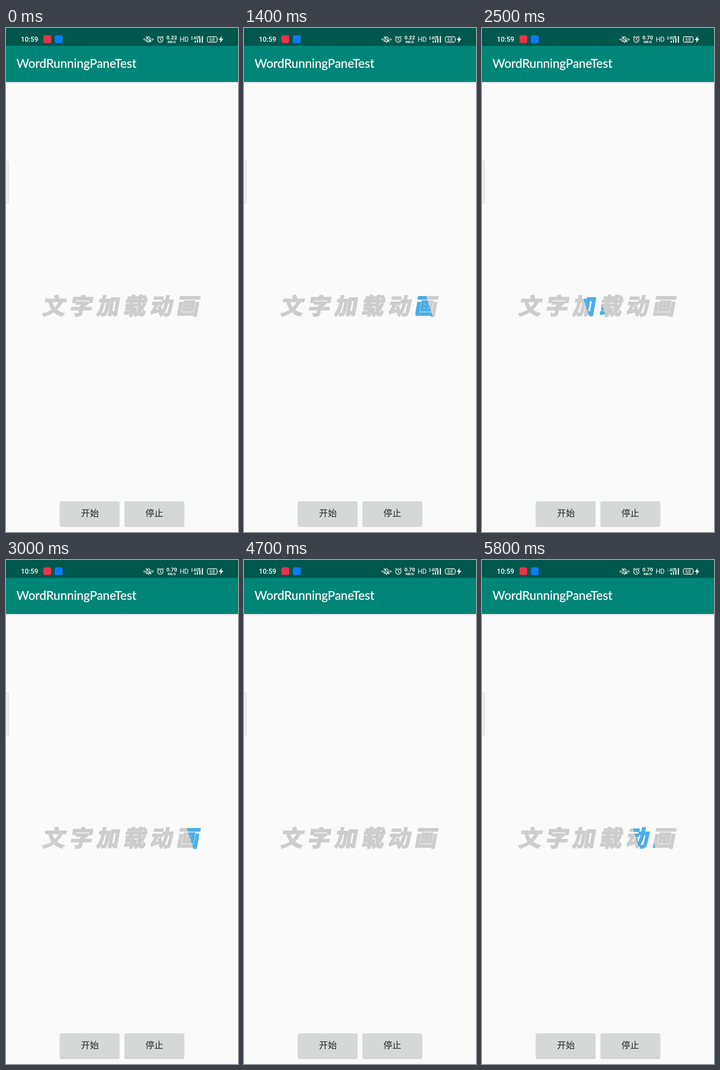
These frames come from a looping animation (508x1102 px, 5900 ms). An HTML page:

```html
<!DOCTYPE html>
<html lang="zh-CN">
<head>
<meta charset="utf-8">
<title>Text sweep</title>
<style>
  html, body { margin: 0; width: 100%; height: 100%; overflow: hidden; background: #fafafa; }
  svg { display: block; width: 100vw; height: 100vh; }
  .ui { font-family: Roboto, "Noto Sans", sans-serif; fill: #fff; }
  .title { font: 400 26.6px Lato, "Open Sans", sans-serif; fill: #fff; stroke: #fff; stroke-width: .3; }
  .mid { text-anchor: middle; }
  .line { fill: none; stroke: #fff; stroke-width: 1.35; stroke-linecap: round; stroke-linejoin: round; }
  .word {
    font: 900 49px "Noto Sans CJK SC", "Noto Sans CJK", sans-serif;
    text-anchor: middle; stroke: currentColor; fill: currentColor; stroke-width: 2.4;
  }
  .label { font: 400 19.5px "Noto Sans CJK SC", "Noto Sans CJK", sans-serif; fill: #222; text-anchor: middle; }
  .button rect { fill: #d6d7d7; filter: drop-shadow(0 1.2px 1.2px rgba(0, 0, 0, .3)); }
</style>
</head>
<body>
<svg viewBox="0 0 508 1102" preserveAspectRatio="none">
  <defs>
    <clipPath id="band"><polygon id="bandShape" points="0,0 0,0 0,0"/></clipPath>
    <linearGradient id="shade" x2="0" y2="1">
      <stop offset="0" stop-color="#000" stop-opacity=".12"/>
      <stop offset="1" stop-color="#000" stop-opacity="0"/>
    </linearGradient>
  </defs>

  <rect width="508" height="1102" fill="#fafafa"/>
  <rect y="118" width="508" height="4" fill="url(#shade)"/>
  <rect y="39" width="508" height="79" fill="#008577"/>
  <rect width="508" height="39" fill="#00574b"/>

  <!-- status bar -->
  <g class="ui">
    <text x="32.5" y="30" font-size="15" font-weight="500">10:59</text>
    <rect x="82" y="16" width="17" height="17" rx="4" fill="#e5344b"/>
    <rect x="107" y="16" width="17" height="17" rx="4" fill="#087cf8"/>

    <g class="line">
      <path d="M306.8 29 H317.2 L315.6 27 V23.5 Q315.6 19.5 312 19.5 Q308.4 19.5 308.4 23.5 V27 Z M311 31.5 H313 M306.5 18.5 L317.5 30.5"/>
      <path d="M304.6 22.8 V27.2 M301.9 24 V26 M319.6 22.8 V27.2 M322.3 24 V26"/>
      <circle cx="338" cy="25.5" r="5.8"/>
      <path d="M338 22.5 V26 L340.3 27.3 M331.4 20.2 L334 18 M344.6 20.2 L342 18"/>
    </g>

    <text id="rate" class="mid" x="363" y="25" font-size="11.6" font-weight="700">0.22</text>
    <text class="mid" x="363" y="33" font-size="8" font-weight="700">KB/S</text>
    <text x="380.5" y="30" font-size="14.2">HD</text>

    <path id="arrows" d="M405 21 L407.2 18.2 L409.4 21 Z M405 23 L407.2 25.8 L409.4 23 Z"/>
    <text x="410.5" y="25" font-size="9" font-weight="500">4G</text>
    <path d="M413 28 h2.4 v4 h-2.4 Z M418 26 h2.4 v6 h-2.4 Z M423.3 22 h2.4 v10 h-2.4 Z M428.8 18 h2.4 v14 h-2.4 Z"/>
    <path d="M421 19.5 h4 M423 17.5 v4" class="line"/>

    <rect x="440.8" y="19" width="21.5" height="12" rx="3.5" class="line"/>
    <path d="M463.2 23 q1.5 2 0 4 Z"/>
    <text class="mid" x="451.5" y="29" font-size="10.5">68</text>
    <path d="M472.4 17.5 L466 26 H470 L468.8 32.5 L476 23.5 H471.7 Z"/>
  </g>

  <text class="title" x="23" y="87">WordRunningPaneTest</text>

  <!-- edge handle -->
  <rect x="-3" y="291" width="8.5" height="92" rx="2" fill="#f1f1f1" stroke="#cfcfcf"/>

  <g id="base" color="#cdcdcd"></g>
  <g id="lit" color="#4aaee6" clip-path="url(#band)"></g>

  <g class="button">
    <rect x="118.5" y="1035" width="129.5" height="54" rx="2.5"/>
    <text class="label" x="183.7" y="1068">开始</text>
  </g>
  <g class="button">
    <rect x="260" y="1035" width="129.5" height="54" rx="2.5"/>
    <text class="label" x="324.7" y="1068">停止</text>
  </g>
</svg>

<script>
  const LOOP = 5900, STEP = 100, CYCLE = 1500, START = 245;
  const BAND = 36, SLOPE = 0.32, LINE_TOP = 586;

  // [ms since the sweep began, leading edge x]
  const SWEEP = [[0, 0], [255, 90], [555, 177], [655, 220], [1055, 366], [1255, 432], [1500, 516]];

  const $ = id => document.getElementById(id);

  const word = '<text class="word" y="626.5" x="107 166 225 284 342 400" ' +
    'transform="translate(0 608) skewX(-10) translate(0 -608)">文字加载动画</text>';
  $("base").innerHTML = word;
  $("lit").innerHTML = word;

  function edgeAt(ms) {
    if (ms < START) return 0;
    const p = (ms - START) % CYCLE;
    const i = SWEEP.findIndex(([end]) => end > p);
    const [t0, x0] = SWEEP[i - 1], [t1, x1] = SWEEP[i];
    return x0 + (x1 - x0) * (p - t0) / (t1 - t0);
  }

  function bandPoints(x) {
    const at = (left, y) => [left + (y - LINE_TOP) * SLOPE, y].join();
    return [at(x - BAND, 570), at(x, 570), at(x, 645), at(x - BAND, 645)].join(" ");
  }

  function draw(now) {
    const ms = Math.floor((now % LOOP) / STEP) * STEP;
    $("bandShape").setAttribute("points", bandPoints(edgeAt(ms)));
    $("rate").textContent = ms < 2500 ? "0.22" : "0.70";
    $("arrows").setAttribute("opacity", ms < 5500 ? 1 : 0.35);
  }

  let begin;
  function tick(now) {
    begin ??= now;
    draw(Math.max(0, now - begin));
    requestAnimationFrame(tick);
  }
  draw(0);
  requestAnimationFrame(tick);
</script>
</body>
</html>
```
